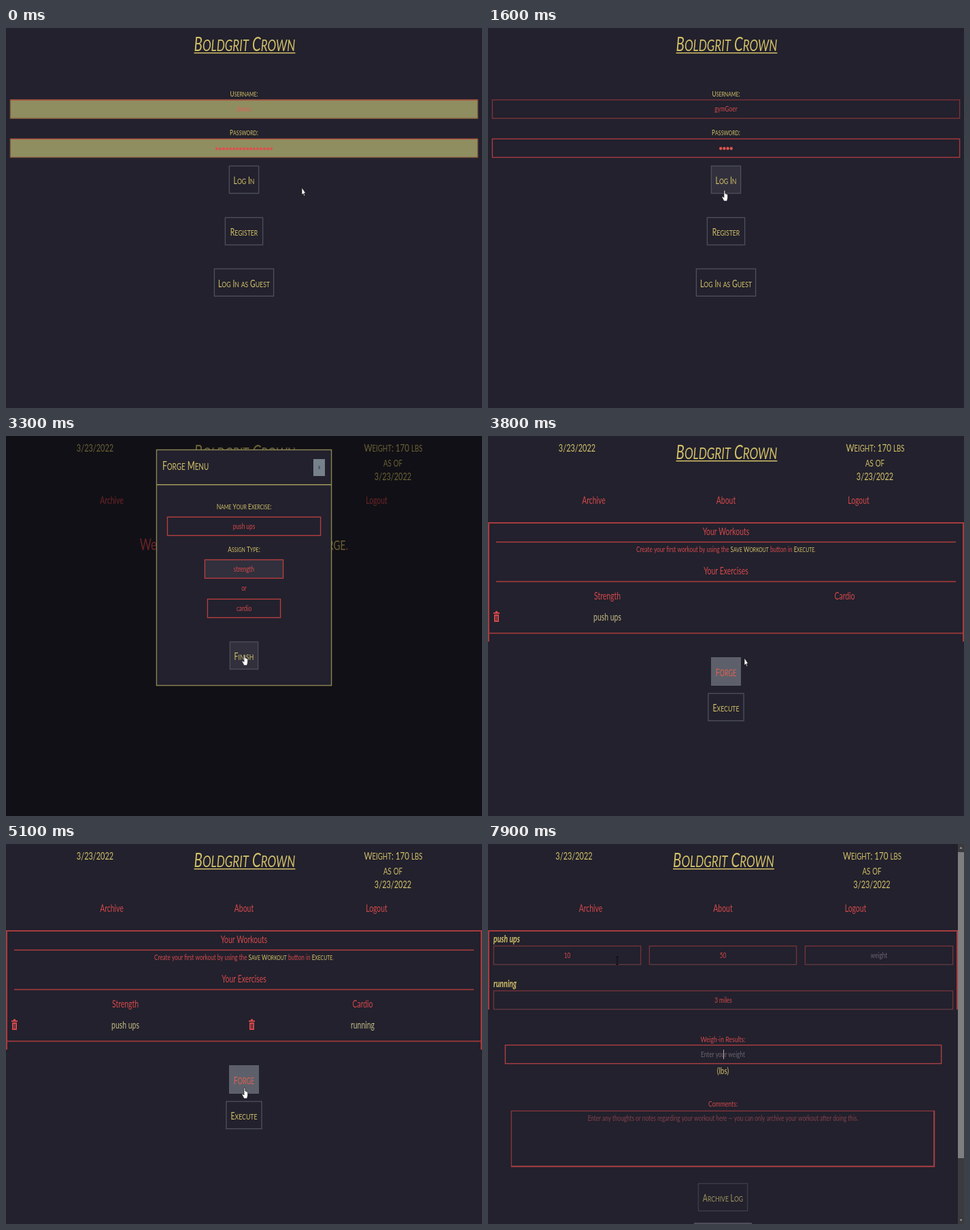
These frames come from a looping animation (700 px wide and 560 px high, 8000 ms). An HTML page with a canvas:

```html
<!DOCTYPE html>
<html lang="en">
<head>
<meta charset="utf-8">
<title>Workout log</title>
<style>
html, body { margin: 0; width: 100%; height: 100%; overflow: hidden; background: #22212d; }
canvas { display: block; }
</style>
</head>
<body>
<canvas id="stage" width="700" height="560"></canvas>
<script>
const ctx = document.getElementById('stage').getContext('2d');
const W = 700, H = 560, LOOP = 8000, STEP = 100;
const BG = '#22212d', GOLD = '#d3c068', RED = '#d5484b', EDGE = '#4e4d5a';
const DIM = '#74323a', LINE = '#a83b3e', HINT = '#6c6470';
const NARROW = 0.72, CAP = 0.83;
const BRAND = 'Boldgrit Crown';

// ---- text ----
const font = (size, style) => `${style} ${size}px Lato, "Open Sans", sans-serif`;

// Splits a string into full-size and small-capital runs.
function runs(s, size, caps) {
  if (!caps) return [[s, size]];
  return s.match(/[a-z]+|[^a-z]+/g).map(r =>
    /[a-z]/.test(r) ? [r.toUpperCase(), size * CAP] : [r, size]);
}

// parts: [string, colour, smallCaps]
function rich(parts, x, y, size, style = '', align = 0.5) {
  const list = [];
  let total = 0;
  for (const [s, color, caps] of parts) {
    for (const [r, px] of runs(s, size, caps)) {
      ctx.font = font(px, style);
      const w = ctx.measureText(r).width * NARROW;
      list.push([r, px, color, w]);
      total += w;
    }
  }
  ctx.save();
  ctx.translate(x - total * align, y);
  ctx.scale(NARROW, 1);
  let at = 0;
  for (const [r, px, color, w] of list) {
    ctx.font = font(px, style);
    ctx.fillStyle = color;
    ctx.fillText(r, at / NARROW, 0);
    at += w;
  }
  ctx.restore();
  return total;
}
const text = (s, x, y, size, color) => rich([[s, color, false]], x, y, size);
const caps = (s, x, y, size, color = GOLD) => rich([[s, color, true]], x, y, size);

// ---- shapes ----
function rect(x, y, w, h, color) {
  ctx.fillStyle = color;
  ctx.fillRect(x, y, w, h);
}
function frame(x, y, w, h, color, width = 1.4) {
  ctx.strokeStyle = color;
  ctx.lineWidth = width;
  ctx.strokeRect(x + 0.4, y + 0.4, w - 0.8, h - 0.8);
}
function button(label, x, y, w, h, hot) {
  if (hot) rect(x, y, w, h, '#31303c');
  frame(x, y, w, h, EDGE);
  caps(label, x + w / 2, y + h / 2 + 6.5, 14.6);
}
function dots(n, x, y, gap, r, color) {
  ctx.fillStyle = color;
  for (let i = 0; i < n; i++) {
    ctx.beginPath();
    ctx.arc(x + (i - (n - 1) / 2) * gap, y, r, 0, 7);
    ctx.fill();
  }
}
function poly(points, fill, stroke) {
  ctx.beginPath();
  points.forEach(([x, y]) => ctx.lineTo(x, y));
  ctx.closePath();
  ctx.fillStyle = fill;
  ctx.fill();
  if (stroke) {
    ctx.strokeStyle = stroke;
    ctx.lineWidth = 0.7;
    ctx.stroke();
  }
}

// ---- timing ----
const typed = (s, t, start, each) =>
  s.slice(0, Math.max(0, Math.floor((t - start) / each) + 1));

const PATH = [
  [0, 435, 235], [100, 435, 235], [300, 396, 121], [700, 392, 125], [900, 385, 180],
  [1300, 376, 186], [1600, 348, 239], [1800, 349, 312], [2000, 350, 300],
  [2200, 350, 240], [2400, 354, 160], [2500, 356, 134], [2900, 362, 140],
  [3100, 360, 197], [3300, 351, 322], [3600, 353, 340], [3800, 377, 327],
  [3900, 358, 345], [4100, 362, 135], [4400, 364, 150], [4600, 364, 225],
  [4800, 358, 252], [5000, 351, 322], [5200, 351, 396], [5400, 340, 380],
  [5700, 190, 172], [8000, 190, 172]
];
function pointer(t) {
  const i = Math.max(1, PATH.findIndex(p => p[0] > t));
  const [t0, x0, y0] = PATH[i - 1], [t1, x1, y1] = PATH[i];
  const k = (t - t0) / (t1 - t0), e = k * k * (3 - 2 * k);
  return [x0 + (x1 - x0) * e, y0 + (y1 - y0) * e];
}
const inside = ([px, py], x, y, w, h) => px >= x && px <= x + w && py >= y && py <= y + h;

function arrow(x, y) {
  const shape = [[0, 0], [0, 11], [2, 9], [3.3, 12.5], [4.7, 12], [3.5, 8.5], [5.6, 8.3]];
  poly(shape.map(([a, b]) => [x + a, y + b]), '#fff', '#111');
}
function hand(x, y) {
  const shape = [[-1, 0], [0.6, 0], [0.9, 5], [4.5, 6.5], [4.6, 11], [3.5, 16],
    [-1, 16], [-3.8, 10.5], [-3, 9], [-1, 11]];
  poly(shape.map(([a, b]) => [x + a, y + b]), '#fff', '#222');
}
function beam(x, y) {
  rect(x - 0.5, y - 6, 1, 12, '#0c0c10');
  rect(x - 2, y - 6, 4, 1, '#0c0c10');
  rect(x - 2, y + 5, 4, 1, '#0c0c10');
}

// ---- screens ----
function title(x) {
  const w = rich([[BRAND, GOLD, true]], x, 34, 28.5, 'italic');
  rect(x - w / 2, 36, w, 1.5, GOLD);
}

function header(dx) {
  title(351 + dx);
  caps('3/23/2022', 131 + dx, 23, 15.2);
  caps('Weight: 170 lbs', 569.5 + dx, 23, 16.2);
  caps('as of', 569 + dx, 45, 16.2);
  caps('3/23/2022', 569 + dx, 65, 15.2);
  text('Archive', 155.5 + dx, 100, 14.5, RED);
  text('About', 350 + dx, 100, 14.5, RED);
  text('Logout', 545 + dx, 100, 14.5, RED);
}

function login(t, p) {
  title(351);
  caps('Username:', 350, 101, 11.7);
  caps('Password:', 350, 158, 11.7);
  const oldUser = t < 400, oldPass = t < 900;
  const field = (y, auto, focus) => {
    if (auto) rect(6, y, 688, 28, '#8f8e60');
    frame(6, y, 688, 28, auto ? '#8b5c40' : focus ? LINE : '#7c3239');
    if (auto) rect(6, y, 688, 1, '#b8423c');
  };
  field(105.5, oldUser, t >= 300 && t < 900);
  field(163, oldPass, t >= 900);
  if (oldUser) text('demo', 350, 123, 11.5, '#e0605a');
  else text(typed('gymGoer', t, 500, 50), 350, 123, 11.5, RED);
  if (oldPass) dots(17, 350, 178, 5, 2.1, '#e0504f');
  else dots(Math.min(4, Math.max(0, Math.floor((t - 900) / 100))), 350, 177.5, 5.2, 2.2, '#e0554f');
  button('Log In', 328, 203, 44, 41, inside(p, 328, 203, 44, 41));
  button('Register', 322, 279, 56, 41, inside(p, 322, 279, 56, 41));
  button('Log In as Guest', 306, 354.5, 88, 41, false);
}

function forge(y, hot) {
  if (!hot) return button('Forge', 328, y, 44, 42, false);
  rect(328, y, 44, 42, '#5d606b');
  caps('Forge', 350, y + 27.5, 15, '#e0604f');
}

function welcome(p) {
  header(0);
  rich([['Welcome! Get started by using the ', RED, false], ['Forge', GOLD, true], ['.', RED, false]],
    350, 168, 23);
  forge(216, inside(p, 328, 216, 44, 42));
}

function bin(x, y) {
  rect(x, y + 2, 9, 2, RED);
  rect(x + 3, y, 3, 2, RED);
  rect(x + 1, y + 5, 7, 11, RED);
  rect(x + 3, y + 7, 1, 7, BG);
  rect(x + 5, y + 7, 1, 7, BG);
}

function exercises(t, p) {
  header(0);
  rect(0, 127, 700, 2, LINE);
  rect(0, 127, 2, 176, LINE);
  rect(698, 127, 2, 176, LINE);
  for (const y of [155.5, 213.7]) rect(12, y, 676, 1.6, LINE);
  rect(2, 289.8, 696, 1.6, LINE);
  text('Your Workouts', 350, 146, 14.5, RED);
  rich([['Create your first workout by using the ', RED, false], ['Save Workout', GOLD, true],
    [' button in ', RED, false], ['Execute', GOLD, true], ['.', RED, false]], 350, 171, 11.4);
  text('Your Exercises', 350, 204, 14.5, RED);
  text('Strength', 175.5, 241, 14.5, RED);
  text('Cardio', 524.5, 241, 14.5, RED);
  bin(8, 258);
  text('push ups', 175.5, 272, 14.5, '#c4b884');
  if (t >= 5100) {
    bin(357, 258);
    text('running', 524.5, 272, 14.5, '#c4b884');
  }
  forge(326, t < 5200);
  button('Execute', 323.5, 379, 53, 41, t >= 5100 && inside(p, 323, 379, 54, 41));
}

function modal(k, name, p, pick) {
  rect(0, 0, W, H, `rgba(0,0,0,${0.5 * Math.min(1, k * 1.5)})`);
  ctx.save();
  ctx.globalAlpha = k < 1 ? 0.2 + k : 1;
  ctx.translate(0, Math.round(-50 * (1 - k)));
  rect(221, 20, 258, 348, k < 1 ? '#211d2c' : BG);
  frame(221, 20, 258, 348, '#8d8653');
  rect(222, 71, 256, 1.5, '#a49a5c');
  rich([['Forge Menu', GOLD, true]], 230, 50, 16.5, '', 0);
  rect(452, 34, 17, 25, '#76818b');
  text('x', 460.5, 49, 9, '#30303a');
  caps('Name Your Exercise:', 350, 108, 11.7);
  frame(237, 119, 226, 28, name ? '#b43e40' : '#613240');
  text(name, 350, 137, 11.5, RED);
  caps('Assign Type:', 350, 171, 11.7);
  if (pick === 1) rect(292, 182, 116, 28, '#31303c');
  frame(292, 182, 116, 28, '#b43e40');
  text('strength', 350, 200, 11.5, RED);
  text('or', 350, 228, 11.5, RED);
  if (pick === 2) rect(296, 240, 108, 28, '#31303c');
  frame(296, 240, 108, 28, '#b43e40');
  text('cardio', 350, 258, 11.5, RED);
  button('Finish', 329, 303, 42, 41, inside(p, 329, 303, 42, 41));
  ctx.restore();
}

function caret(x, y) {
  rect(x, y - 7, 1, 14, '#c9a0a4');
}

function input(x, y, w, value, hint, focus) {
  frame(x, y, w, 28, focus ? '#a94045' : DIM);
  rect(x + 1, y + 27, w - 1, 1, focus ? '#a07a80' : '#5c3a45');
  const s = value || hint;
  const tw = text(s, x + w / 2, y + 18, 11.5, value ? RED : HINT);
  if (focus) caret(x + w / 2 + (value ? tw / 2 + 1 : 0), y + 14);
}

function reps(t) {
  if (t < 6200) return '';
  if (t < 6400) return '6';
  return typed('50', t, 6500, 100);
}

function session(t) {
  header(-4.5);
  rect(0, 127, 691, 2, LINE);
  rect(0, 127, 2, 117, LINE);
  rect(689, 127, 2, 117, LINE);
  const label = (s, y) => rich([[s, GOLD, false]], 8, y, 14.5, 'italic bold', 0);
  label('push ups', 145);
  label('running', 211);
  input(8, 150, 217, typed('10', t, 5900, 100), 'sets', t >= 5700 && t < 6100);
  input(237, 150, 217, reps(t), 'reps', t >= 6100 && t < 6700);
  input(466, 150, 218, '', 'weight', t === 6700);
  input(8, 216, 676, typed('3 miles', t, 6900, 100), 'length', t >= 6800 && t < 7700);
  text('Weigh-in Results:', 345.5, 292, 12, RED);
  const weigh = t >= 7700;
  frame(25, 296, 642, 28, weigh ? '#ad4044' : '#86343a');
  text('Enter your weight', 345.5, 314, 11.5, HINT);
  if (weigh) caret(346, 310);
  text('(lbs)', 345.5, 339, 14, GOLD);
  text('Comments:', 345.5, 387, 12, RED);
  frame(34, 393, 623, 83, '#84363a');
  rect(34, 474, 623, 2, '#9c3c40');
  rect(655, 393, 2, 83, '#9c3c40');
  text('Enter any thoughts or notes regarding your workout here — you can only archive your workout after doing this.',
    345.5, 408, 11.4, '#85404a');
  frame(309, 500, 73, 41, '#3d3c48');
  caps('Archive Log', 345.5, 527, 14.5, '#9d9260');
  rect(303, 558, 85, 2, EDGE);
  rect(691, 0, 9, H, '#3b3b3f');
  rect(691, 12, 9, 451, '#7f7f80');
  poly([[693.5, 7], [697.5, 7], [695.5, 4]], '#999');
  poly([[693.5, 553], [697.5, 553], [695.5, 556]], '#999');
}

function draw(t) {
  const p = pointer(t);
  rect(0, 0, W, H, BG);
  let overButton = false, overField = false;
  if (t < 1900) {
    login(t, p);
    overButton = inside(p, 328, 203, 44, 41) || inside(p, 322, 279, 56, 41);
    overField = inside(p, 6, 106, 688, 28) || inside(p, 6, 163, 688, 28);
  } else if (t < 3400) {
    welcome(p);
    if (t >= 2400) modal(t < 2500 ? 0.66 : 1, typed('push ups', t, 2600, 50), p, t >= 3100 ? 1 : 0);
    overButton = t < 2400 ? inside(p, 328, 216, 44, 42) : inside(p, 329, 303, 42, 41);
  } else if (t < 5400) {
    exercises(t, p);
    const open = t >= 4000 && t < 5100;
    if (open) modal(t < 4100 ? 0.66 : 1, typed('running', t, 4200, 50), p, t >= 4800 ? 2 : 0);
    overButton = open ? inside(p, 329, 303, 42, 41)
      : inside(p, 328, 326, 44, 42) || inside(p, 323, 379, 54, 41);
  } else {
    session(t);
    overField = inside(p, 8, 150, 217, 28);
  }
  if (overButton) hand(...p);
  else if (overField) beam(...p);
  else arrow(...p);
}

const start = performance.now();
function tick() {
  const t = (performance.now() - start) % LOOP;
  draw(Math.floor(t / STEP) * STEP);
  requestAnimationFrame(tick);
}
tick();
</script>
</body>
</html>
```
